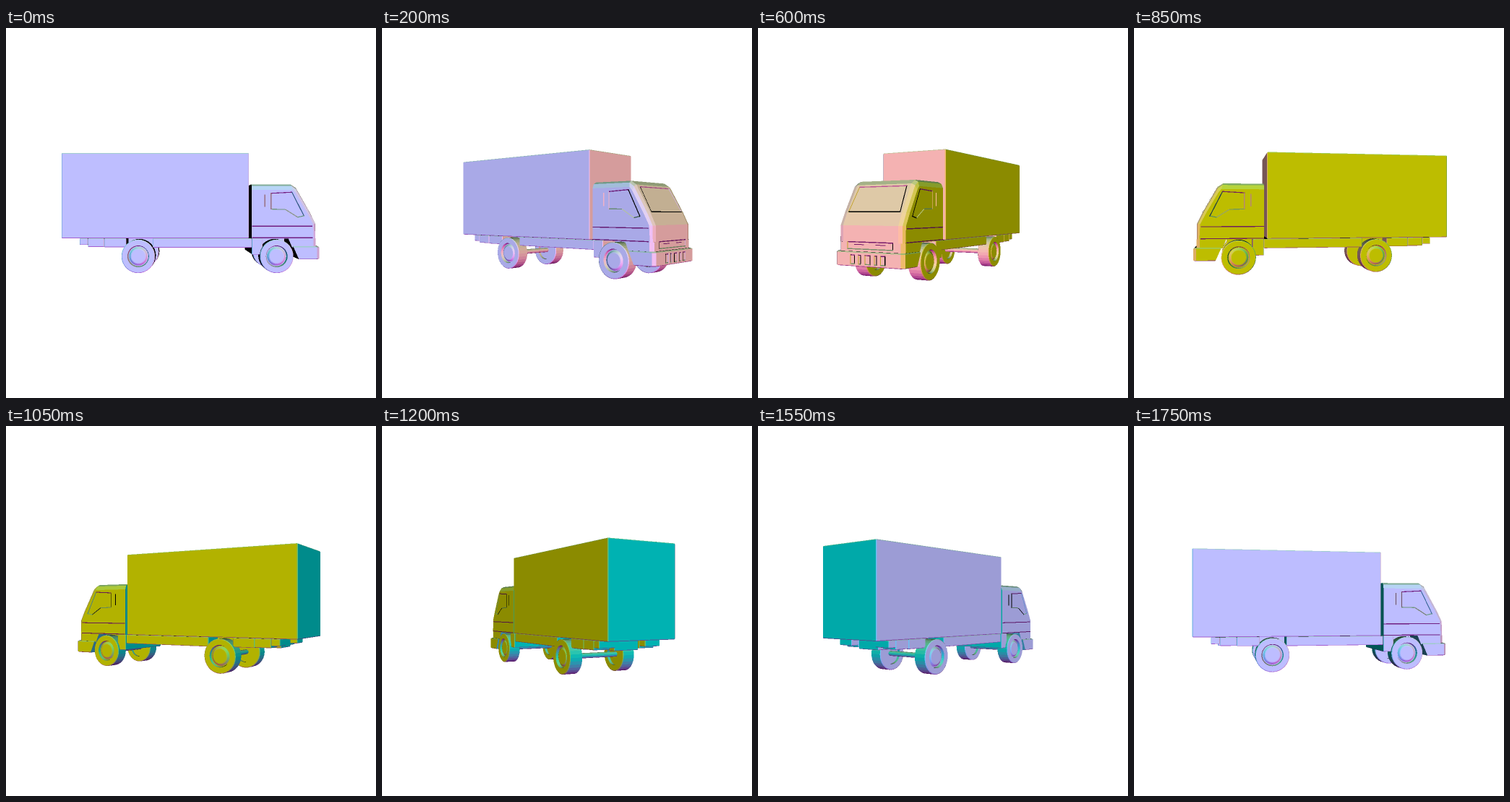
Recreate the animation shown at these times as an HTML page with a canvas. Size 512 by 512 pixels, loop 1800 ms.

```html
<!DOCTYPE html>
<html lang="en">
<head>
<meta charset="utf-8">
<title>Truck turntable</title>
<style>
html, body { margin: 0; width: 100%; height: 100%; overflow: hidden; background: #fff; }
canvas { display: block; width: 512px; height: 512px; }
</style>
</head>
<body>
<canvas id="stage" width="512" height="512"></canvas>
<script>
const SIZE = 512, SS = 2, N = SIZE * SS, CAM = 710;
const STEP_MS = 50, STEPS = 36;
const GAIN = 1.05, GAMMA = 1 / 2.2;

// ---- model: x forward, y up, z towards the viewer at angle 0 ----
const faces = [];
const sub = (a, b) => a.map((v, i) => v - b[i]);
const dot = (a, b) => a[0] * b[0] + a[1] * b[1] + a[2] * b[2];
const cross = (a, b) => [a[1] * b[2] - a[2] * b[1], a[2] * b[0] - a[0] * b[2], a[0] * b[1] - a[1] * b[0]];
const unit = a => { const l = Math.hypot(...a) || 1; return a.map(v => v / l); };
const mean = ps => [0, 1, 2].map(i => ps.reduce((s, p) => s + p[i], 0) / ps.length);
const add = (pts, n) => faces.push({ pts, n: unit(n) });

// Convex solid skinned over rings of equal length
function loft(rings) {
  const mid = mean(rings.flat());
  const skin = pts => {
    const k = pts.length >> 2;
    const n = cross(sub(pts[2 * k], pts[0]), sub(pts[3 * k], pts[k]));
    add(pts, dot(n, sub(mean(pts), mid)) < 0 ? n.map(v => -v) : n);
  };
  for (let i = 1; i < rings.length; i++) {
    const a = rings[i - 1], b = rings[i];
    a.forEach((p, j) => { const k = (j + 1) % a.length; skin([p, a[k], b[k], b[j]]); });
  }
  skin(rings[0]);
  skin(rings[rings.length - 1]);
}

// Box with bevelled edges
function slab(x0, x1, y0, y1, z0, z1, e = 0.7) {
  const ring = (y, i) => [
    [x0 + e, z0 + i], [x1 - e, z0 + i], [x1 - i, z0 + e], [x1 - i, z1 - e],
    [x1 - e, z1 - i], [x0 + e, z1 - i], [x0 + i, z1 - e], [x0 + i, z0 + e]
  ].map(([x, z]) => [x, y, z]);
  loft([ring(y0, e), ring(y0 + e, 0), ring(y1 - e, 0), ring(y1, e)]);
}

// Profile of [z, r] spun around an axle; side mirrors it
function lathe(cx, cy, profile, side, seg = 32) {
  const at = (z, r, t) => [cx + r * Math.cos(t), cy + r * Math.sin(t), z * side];
  for (let i = 1; i < profile.length; i++) {
    const [z0, r0] = profile[i - 1], [z1, r1] = profile[i];
    for (let j = 0; j < seg; j++) {
      const a = j / seg * 2 * Math.PI, b = (j + 1) / seg * 2 * Math.PI, m = (a + b) / 2;
      const nr = z1 - z0, nz = r0 - r1;
      add([at(z0, r0, a), at(z0, r0, b), at(z1, r1, b), at(z1, r1, a)],
        [nr * Math.cos(m), nr * Math.sin(m), nz * side]);
    }
  }
}

// Groove along a path on a surface, lit like a small step facing left of the path
function groove(path, at, out, closed = true, w = 1.1) {
  const o = at(0, 0);
  path.forEach((p, i) => {
    if (!closed && i === path.length - 1) return;
    const q = path[(i + 1) % path.length];
    const dx = q[0] - p[0], dy = q[1] - p[1], l = Math.hypot(dx, dy);
    const u = [-dy / l, dx / l];
    const inner = ([a, b]) => at(a + u[0] * w, b + u[1] * w);
    const wall = sub(at(...u), o);
    add([at(...p), at(...q), inner(q), inner(p)], wall.map((v, k) => v * 0.9 + out[k] * 0.3));
  });
}
const rect = (a0, a1, b0, b1) => [[a0, b1], [a0, b0], [a1, b0], [a1, b1]];

// cargo box and chassis
slab(-167.5, 75, -32.7, 77.6, -46.8, 46.8, 0.8);
slab(-50, 79, -45, -33, -43, 43);
slab(-137, 126, -45.5, -33, -17, 17);
for (const s of [-1, 1]) {
  const [a, b] = s < 0 ? [-43, -21] : [21, 43];
  slab(-145, -134, -41.5, -33, a, b);
  slab(-134, -113, -44, -33, a, b);
  slab(-113, -84, -44.5, -33, a, b);
}

// cab, with rounded shoulders between the side and middle profiles
const cabSide = [[78.7, -33], [78.7, 30], [132, 30], [135.5, 26], [150.7, 0], [158, -14], [159, -33]];
const cabMid = [[78.7, -33], [79, 37.5], [130, 37.5], [137, 33], [155.8, 0], [162.5, -14], [162.5, -33]];
const cabRing = (f, z) => cabSide.map(([x, y], i) =>
  [x + (cabMid[i][0] - x) * f, y + (cabMid[i][1] - y) * f, z]);
const shoulders = [[0, 45.5], [0.7, 43.2], [1, 38.5]];
loft([
  ...shoulders.map(([f, z]) => cabRing(f, -z)),
  ...shoulders.map(([f, z]) => cabRing(f, z)).reverse()
]);
slab(79, 93, -54, -33, -44, 44);

// nose and bumper, seen from above
const nose = (back, front, half, cut, y) => [
  [back, -half], [front - cut, -half], [front, cut - half],
  [front, half - cut], [front - cut, half], [back, half]
].map(([x, z]) => [x, y, z]);
loft([nose(126, 162.5, 45.5, 4, -33), nose(131, 162.5, 45.5, 4, -44.5)]);
loft([nose(132, 164.8, 46.5, 3.5, -43.2), nose(132.5, 166.3, 47.8, 3.5, -44.4),
  nose(139, 166.3, 47.8, 3.5, -59), nose(139.5, 165, 46.5, 3.5, -59.8)]);

// wheels
const tyre = [[34, 0], [34, 14], [30, 14], [30, 20.8], [30.7, 21.7], [46.8, 21.7], [47.5, 20.9],
  [47.5, 14], [44, 13], [44, 12.2], [46, 10], [46.4, 9], [46.4, 0]];
for (const x of [110.7, -68.2]) {
  for (const s of [-1, 1]) lathe(x, -56, tyre, s);
  lathe(x, -56, [[-34, 3.3], [34, 3.3]], 1, 12);
}

// side windows and door seams
for (const s of [-1, 1]) {
  const at = (a, b) => [a, b, s * 45.85], out = [0, 0, s];
  groove([[103, 26], [103, 4.5], [122, 4], [138, -6], [147, -4], [131, 27.5]], at, out);
  groove([[157, -16.5], [79, -16.5]], at, out, false);
  groove([[157.5, -31.5], [79, -31.5]], at, out, false);
  groove([[95, 24], [95, 8]], at, out, false, 1.3);
}

// windscreen, grille and bumper slots
const front = [1, 0, 0];
groove([[-34, 31], [-36.7, 0.8], [36.7, 0.8], [34, 31]],
  (z, y) => [137.5 + (33 - y) * 18.8 / 33, y, z], front);
const grille = (z, y) => [162.9, y, z];
groove(rect(-32, 32, -41, -32), grille, front);
groove([[22, -35], [8, -35]], grille, front, false, 0.8);
groove([[-8, -35], [-22, -35]], grille, front, false, 0.8);
for (const [c, half] of [[-21, 3.5], [-11, 2], [0, 4], [11, 2], [21, 3.5]])
  groove(rect(c - half, c + half, -57.5, -46.5), (z, y) => [166.7, y, z], front);

// ---- renderer ----
const view = document.getElementById('stage').getContext('2d');
const big = document.createElement('canvas');
big.width = big.height = N;
const bigCtx = big.getContext('2d');
const image = bigCtx.createImageData(N, N);
const pixels = new Uint32Array(image.data.buffer);
const depth = new Float32Array(N * N);

// The normal is the colour, lit from the camera and gamma encoded
function shade(n, lit) {
  const [r, g, b] = n.map(v =>
    Math.round(255 * Math.min(1, (1 + v) / 2 * Math.max(0, lit) * GAIN) ** GAMMA));
  return (255 << 24 | b << 16 | g << 8 | r) >>> 0;
}

function triangle(a, b, c, colour) {
  const area = (b[0] - a[0]) * (c[1] - a[1]) - (b[1] - a[1]) * (c[0] - a[0]);
  if (Math.abs(area) < 1e-6) return;
  const x0 = Math.max(0, Math.floor(Math.min(a[0], b[0], c[0])));
  const x1 = Math.min(N - 1, Math.ceil(Math.max(a[0], b[0], c[0])));
  const y0 = Math.max(0, Math.floor(Math.min(a[1], b[1], c[1])));
  const y1 = Math.min(N - 1, Math.ceil(Math.max(a[1], b[1], c[1])));
  for (let y = y0; y <= y1; y++) {
    const py = y + 0.5;
    for (let x = x0; x <= x1; x++) {
      const px = x + 0.5;
      const u = ((b[0] - px) * (c[1] - py) - (b[1] - py) * (c[0] - px)) / area;
      const v = ((c[0] - px) * (a[1] - py) - (c[1] - py) * (a[0] - px)) / area;
      const w = 1 - u - v;
      if (u < -1e-6 || v < -1e-6 || w < -1e-6) continue;
      const d = u * a[2] + v * b[2] + w * c[2], i = y * N + x;
      if (d > depth[i]) { depth[i] = d; pixels[i] = colour; }
    }
  }
}

function render(angle) {
  const cos = Math.cos(angle), sin = Math.sin(angle);
  const turn = ([x, y, z]) => [x * cos - z * sin, y, x * sin + z * cos];
  const project = p => {
    const [x, y, z] = turn(p), k = CAM / (CAM - z);
    return [N / 2 + x * k * SS, N / 2 - y * k * SS, k];
  };
  pixels.fill(0xffffffff);
  depth.fill(0);
  for (const { pts, n } of faces) {
    const colour = shade(n, turn(n)[2]), q = pts.map(project);
    for (let i = 2; i < q.length; i++) triangle(q[0], q[i - 1], q[i], colour);
  }
  bigCtx.putImageData(image, 0, 0);
  view.drawImage(big, 0, 0, SIZE, SIZE);
}

let shown = -1;
function tick() {
  const step = Math.floor(performance.now() / STEP_MS) % STEPS;
  if (step !== shown) {
    shown = step;
    render(step / STEPS * 2 * Math.PI);
  }
  requestAnimationFrame(tick);
}
tick();
</script>
</body>
</html>
```
